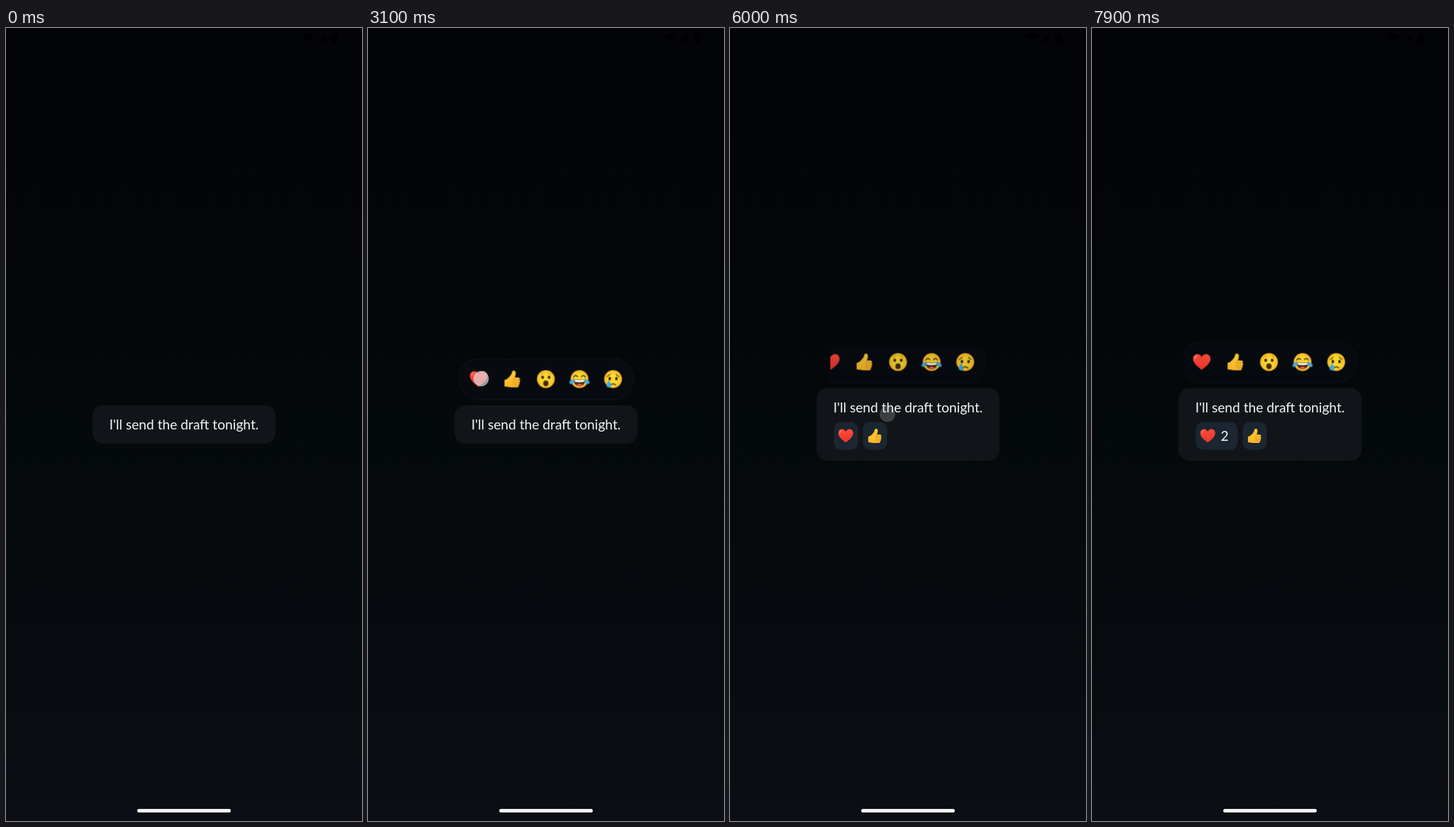
Recreate the animation shown at these times as an HTML page with a canvas. Size 502 by 1116 pixels, loop 8000 ms.

```html
<!DOCTYPE html>
<html lang="en">
<head>
<meta charset="utf-8">
<title>Message reactions</title>
<style>
  html, body { margin: 0; width: 100%; height: 100%; overflow: hidden; background: #05080b; }
  canvas { display: block; width: 502px; height: 1116px; }
</style>
</head>
<body>
<canvas id="stage"></canvas>
<script>
const W = 502, H = 1116, LOOP = 8000, STEP = 100;
const BAR = { w: 247, h: 59, cx: 251 };
const FONT = '19.2px Lato, sans-serif';
const SCALE = window.devicePixelRatio || 1;

// Each tap: position, press and release time; the release triggers its action.
const TAPS = [
  { x: 178.5, y: 549.5, down: 1100, up: 1281, opens: true },
  { x: 159.5, y: 493.5, down: 3100, up: 3238, opens: false },
  { x: 201.5, y: 547.5, down: 4100, up: 4230, opens: true },
  { x: 205, y: 471, down: 5000, up: 5150, opens: false },
  { x: 222, y: 543.5, down: 5700, up: 5813, opens: true },
  { x: 157, y: 471, down: 6500, up: 6580, opens: false },
  { x: 212, y: 553.5, down: 7500, up: 7570, opens: true }
];

function makeLayer(canvas, w, h) {
  canvas.width = Math.round(w * SCALE);
  canvas.height = Math.round(h * SCALE);
  const c = canvas.getContext('2d');
  c.scale(SCALE, SCALE);
  return c;
}

function roundBox(c, x, y, w, h, r, fill, line) {
  c.beginPath();
  c.roundRect(x, y, w, h, r);
  if (fill) { c.fillStyle = fill; c.fill(); }
  if (line) { c.strokeStyle = line; c.lineWidth = 1; c.stroke(); }
}

function oval(c, x, y, rx, ry, fill) {
  c.beginPath();
  c.ellipse(x, y, rx, ry, 0, 0, Math.PI * 2);
  c.fillStyle = fill;
  c.fill();
}

function shape(c, d, fill) {
  c.fillStyle = fill;
  c.fill(new Path2D(d));
}

function line(c, d, color, width) {
  c.strokeStyle = color;
  c.lineWidth = width;
  c.lineCap = c.lineJoin = 'round';
  c.stroke(new Path2D(d));
}

// Emoji are drawn in a 128-unit box.
const BROWN = '#422b0d', TEAR = '#42ade2';

function face(c) {
  const g = c.createRadialGradient(64, 64, 0, 64, 64, 61);
  g.addColorStop(0.5, '#fdd930');
  g.addColorStop(0.92, '#f7c02b');
  g.addColorStop(1, '#f4a223');
  oval(c, 64, 64, 61, 61, g);
}

function heart(c) {
  const g = c.createLinearGradient(0, 10, 0, 118);
  g.addColorStop(0, '#fb4a3c');
  g.addColorStop(1, '#e8352c');
  shape(c, 'M64 118C52 105 4 79 4 42C4 22 18 10 34 10C47 10 58 18 64 29C70 18 81 10 94 10C110 10 124 22 124 42C124 79 76 105 64 118Z', g);
  line(c, 'M17 42C17 30 23 24 32 22', '#ff7a6c', 7);
}

function thumb(c) {
  const g = c.createLinearGradient(0, 5, 0, 122);
  g.addColorStop(0, '#fdcd32');
  g.addColorStop(1, '#f9b62a');
  shape(c, 'M11 70C25 67 36 59 45 48C55 37 60 30 62 18C64 5 83 2 87 17C90 30 85 42 81 52L107 54C119 56 119 69 111 71C121 75 119 87 111 89C117 93 115 103 107 105C111 112 106 121 96 121L57 121C40 121 30 115 11 115Z', g);
  line(c, 'M80 53C72 56 70 63 76 69L110 71M77 70C69 76 71 84 77 87L110 89M78 88C72 94 74 101 80 104L106 105', '#dc8f18', 4.5);
}

function wow(c) {
  face(c);
  oval(c, 42, 52, 9, 12, BROWN);
  oval(c, 86, 52, 9, 12, BROWN);
  oval(c, 64, 93, 18, 20, BROWN);
  line(c, 'M29 30Q36 22 46 22M82 22Q92 22 99 30', '#d18a1c', 4);
}

function joy(c) {
  face(c);
  line(c, 'M25 50Q38 30 51 48M77 48Q90 30 103 50', BROWN, 7);
  shape(c, 'M23 65Q64 74 105 65C104 94 88 113 64 113C40 113 24 94 23 65Z', BROWN);
  shape(c, 'M28 68Q64 76 100 68L97 82Q64 88 31 82Z', '#fff');
  shape(c, 'M42 105Q64 86 86 105Q64 118 42 105Z', '#ed5b62');
  const tear = 'M25 60C30 75 27 96 10 98C-7 98 -9 81 2 74C11 68 19 66 25 60Z';
  shape(c, tear, TEAR);
  c.save();
  c.translate(128, 0);
  c.scale(-1, 1);
  shape(c, tear, TEAR);
  c.restore();
}

function cry(c) {
  face(c);
  oval(c, 41, 61, 9, 12, BROWN);
  oval(c, 87, 61, 9, 12, BROWN);
  line(c, 'M22 47Q36 42 43 31M85 31Q92 42 106 47', BROWN, 5);
  line(c, 'M49 104Q64 89 81 104', BROWN, 7);
  shape(c, 'M35 72C42 86 53 94 52 107C50 125 21 126 19 107C18 95 30 86 35 72Z', TEAR);
}

function emoji(c, draw, x, y, size) {
  c.save();
  c.translate(x - size / 2, y - size / 2);
  c.scale(size / 128, size / 128);
  draw(c);
  c.restore();
}

const barLayer = document.createElement('canvas');
const barCtx = makeLayer(barLayer, BAR.w, BAR.h);
roundBox(barCtx, 0.5, 0.5, BAR.w - 1, BAR.h - 1, 28, '#070b0f', '#12181d');
[heart, thumb, wow, joy, cry].forEach((draw, i) =>
  emoji(barCtx, draw, 28.5 + 47.4 * i, 29.6, 26.4));

const ctx = makeLayer(document.getElementById('stage'), W, H);

function drawBackdrop() {
  const g = ctx.createLinearGradient(0, 0, 0, H);
  g.addColorStop(0, '#030408');
  g.addColorStop(0.25, '#030508');
  g.addColorStop(0.5, '#04090c');
  g.addColorStop(0.75, '#070b0f');
  g.addColorStop(1, '#0b0e14');
  ctx.fillStyle = g;
  ctx.fillRect(0, 0, W, H);
  shape(ctx, 'M417 11Q425 4 434 11L425 20ZM440 19L450 9V19Z', '#000');
  roundBox(ctx, 459, 8, 9, 13, 2, '#000');
  roundBox(ctx, 185, 1099, 132, 5, 2.5, '#f3f4f3');
}

function label(text, x, baseline) {
  ctx.font = FONT;
  ctx.textAlign = 'center';
  ctx.fillStyle = '#f4f5f6';
  ctx.fillText(text, x, baseline);
}

function chip(x, w, draw) {
  roundBox(ctx, x, 554.5, w, 39, 10, '#1b2630');
  emoji(ctx, draw, x + 16.7, 574, 22.4);
}

function drawCard(reactions) {
  const lift = reactions ? 24 : 0;
  roundBox(ctx, 122, 531 - lift, 258, 54 + 2 * lift, 15, '#111519');
  label("I'll send the draft tonight.", 251, 565 - lift);
  if (!reactions) return;
  const heartWidth = reactions > 2 ? 59 : 34;
  chip(146.5, heartWidth, heart);
  if (reactions > 2) label('2', 187, 581);
  if (reactions > 1) chip(146.5 + heartWidth + 7, 34, thumb);
}

// Critically damped spring, 0 to 1
function spring(ms) {
  const a = ms / 50;
  const p = 1 - (1 + a) * Math.exp(-a);
  return p > 0.997 ? 1 : p;
}

function drawBar(p, bottom) {
  if (p <= 0) return;
  const w = BAR.w * p, h = BAR.h * p;
  ctx.save();
  ctx.beginPath();
  ctx.rect(BAR.cx - w / 2, bottom - h, w, h);
  ctx.clip();
  ctx.globalAlpha = p;
  ctx.drawImage(barLayer, BAR.cx + w / 2 - BAR.w, bottom - BAR.h, BAR.w, BAR.h);
  ctx.restore();
}

function drawTouch(tap, t) {
  const level = t < tap.up ? 1 : 1 - (t - tap.up) / 270;
  if (t < tap.down || level <= 0) return;
  ctx.save();
  ctx.globalAlpha = level;
  oval(ctx, tap.x, tap.y, 10.5, 10.5, 'rgba(226,230,232,0.66)');
  ctx.strokeStyle = 'rgba(205,225,238,0.5)';
  ctx.lineWidth = 1;
  ctx.stroke();
  ctx.restore();
}

function render(t) {
  const done = TAPS.filter(tap => t >= tap.up);
  const last = done[done.length - 1];
  const reactions = done.filter(tap => !tap.opens).length;
  let open = 0;
  if (last) {
    const p = spring(t - last.up);
    open = last.opens ? p : 1 - p;
  }
  drawBackdrop();
  drawCard(reactions);
  drawBar(open, reactions ? 499.5 : 523.5);
  TAPS.forEach(tap => drawTouch(tap, t));
}

const start = performance.now();
function tick() {
  const t = (performance.now() - start) % LOOP;
  render(Math.floor(t / STEP) * STEP);
  requestAnimationFrame(tick);
}
tick();
</script>
</body>
</html>
```
